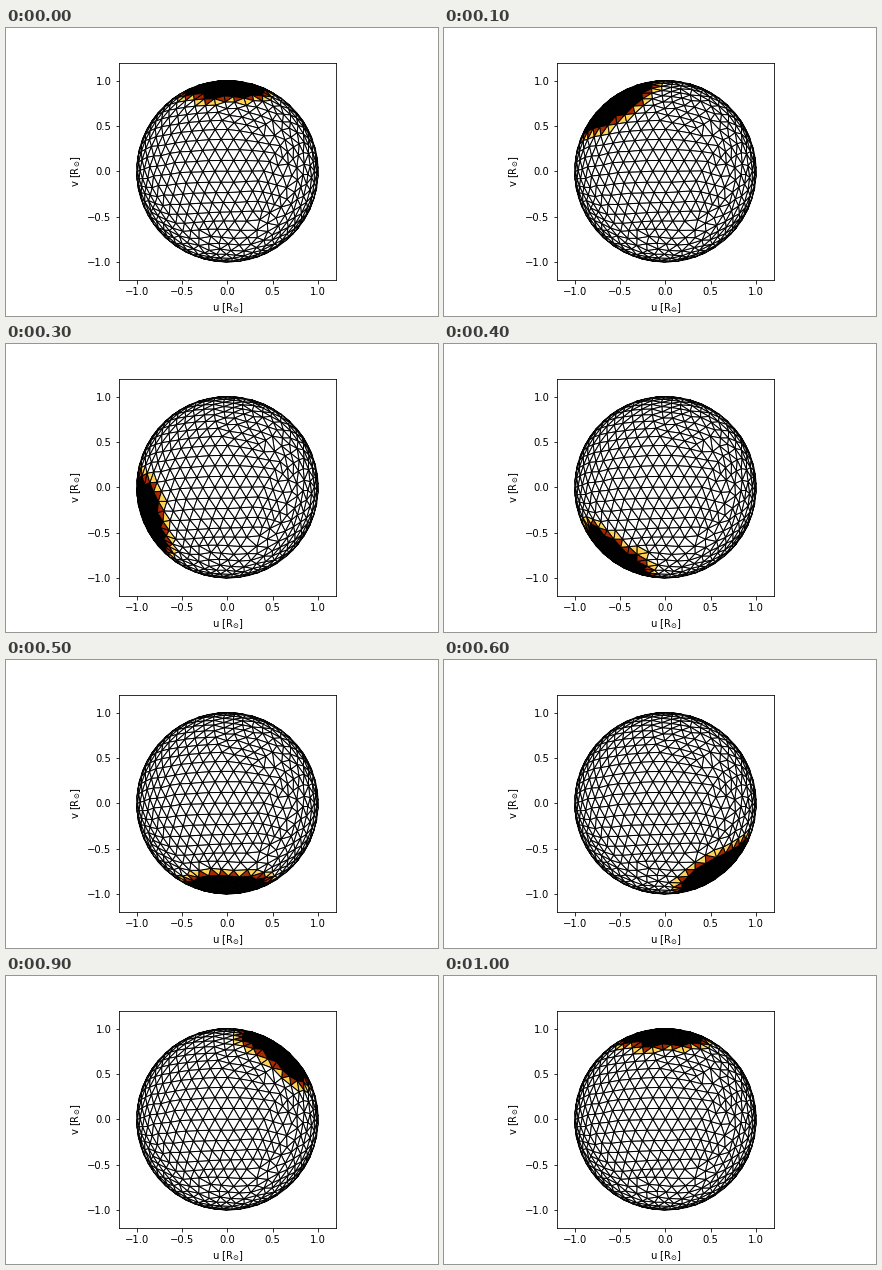
Write a matplotlib script that moves like this. It is 432 by 288 pixels and loops after 1100 ms.

```python
import numpy as np
import matplotlib.pyplot as plt
from matplotlib.animation import FuncAnimation
from matplotlib.collections import PolyCollection

FRAMES, INTERVAL = 11, 100
N_TRIANGLES = 1500
DELTA = np.sqrt(4 / np.sqrt(3) * 4 * np.pi / N_TRIANGLES)
Z_MIN = -0.3  # the far side is never seen
COLAT, RADIUS = np.radians(80), np.radians(30)
MIRROR = np.radians(120)  # axis that sets the winding of the mesh


def unit(v):
    return v / np.linalg.norm(v, axis=-1, keepdims=True)


def dot(a, b):
    return np.sum(a * b, axis=-1)


def turn(n, a, b):
    """Counterclockwise angle from a to b in the plane normal to n."""
    sin = dot(n, np.cross(a, b))
    cos = dot(a, b) - dot(a, n) * dot(b, n)
    return np.arctan2(sin, cos) % (2 * np.pi)


def fan(p, a, angles):
    """Points on the sphere one step from p, at angles from direction a."""
    e1 = unit(a - dot(a, p) * p)
    e2 = np.cross(p, e1)
    return [unit(p + DELTA * (np.cos(t) * e1 + np.sin(t) * e2)) for t in angles]


def front_angles(pos):
    return turn(pos, np.roll(pos, 1, axis=0) - pos, np.roll(pos, -1, axis=0) - pos)


def find_split(pos, omega, start, count):
    """Pair of front members that come too close across the open side."""
    n = len(pos)
    for i in range(start, start + count):
        step = pos - pos[i]
        gap = np.abs(np.arange(n) - i)
        near = np.linalg.norm(step, axis=1) < DELTA
        near &= np.minimum(gap, n - gap) > 2
        for j in np.flatnonzero(near):
            if turn(pos[i], pos[i - 1] - pos[i], step[j]) < omega[i]:
                return min(i, j), max(i, j)
    return None


def march():
    """Marching triangulation of the unit sphere, started at the pole."""
    pole = np.array([0.0, 0.0, 1.0])
    pts = [pole] + fan(pole, np.array([-1.0, 0.0, 0.0]), np.arange(6) * np.pi / 3)
    tris = [(0, k + 1, (k + 1) % 6 + 1) for k in range(6)]
    stack = [list(range(1, 7))]
    while stack and len(tris) < 2 * N_TRIANGLES:
        front = stack[-1]
        if len(front) < 4:
            tris.append(tuple(front[::-1]))
            stack.pop()
            continue
        pos = np.array([pts[k] for k in front])
        omega = np.where(pos[:, 2] > Z_MIN, np.round(front_angles(pos), 9), np.inf)
        i = int(np.argmin(omega))
        w = omega[i]
        if np.isinf(w):
            stack.pop()
            continue

        p, last, nxt = front[i], front[i - 1], front[(i + 1) % len(front)]
        a, b = pts[last] - pts[p], pts[nxt] - pts[p]
        nt = int(3 * w / np.pi) + 1
        if nt > 1 and w / nt < 0.8:
            nt -= 1
        elif nt == 1 and w > 0.8 and np.linalg.norm(a - b) > 1.25 * DELTA:
            nt = 2
        shortest = min(np.linalg.norm(a), np.linalg.norm(b))
        if len(front) == 4 or (w < 3 and shortest <= 0.5 * DELTA):
            nt = 1

        new = list(range(len(pts), len(pts) + nt - 1))
        pts += fan(pts[p], a, np.arange(1, nt) * w / nt)
        ring = [last] + new + [nxt]
        tris += [(p, q, r) for q, r in zip(ring, ring[1:])]
        front[i:i + 1] = new

        if new and len(front) > 5:
            pos = np.array([pts[k] for k in front])
            pair = find_split(pos, front_angles(pos), i, len(new))
            if pair:
                lo, hi = pair
                stack[-1] = front[:lo + 1] + front[hi:]
                stack.append(front[lo:hi + 1])
    return np.array(pts), np.array(tris)


def reflect(pts):
    c, s = np.cos(2 * MIRROR), np.sin(2 * MIRROR)
    return pts @ np.array([[c, s, 0], [s, -c, 0], [0, 0, 1]])


def padded(values):
    lo, hi = values.min(), values.max()
    pad = 0.1 * (hi - lo)
    return lo - pad, hi + pad


points, triangles = march()
corners = points[triangles]
normal = np.cross(corners[:, 1] - corners[:, 0], corners[:, 2] - corners[:, 0])
triangles = triangles[normal[:, 2] > 0]
triangles = triangles[np.argsort(points[triangles, 2].mean(axis=1))]
points = reflect(points)
# Lift the vertices so that the flat faces keep the volume of the sphere.
corners = points[triangles] * (1 + DELTA ** 2 / 8)

fig = plt.figure(figsize=(6, 4), dpi=72, facecolor="white")
fig.subplots_adjust(left=0.125, right=0.9, bottom=0.125, top=0.88)
ax = fig.add_subplot(aspect="equal", xlim=padded(corners[..., 0]), ylim=padded(corners[..., 1]))
ticks = np.linspace(-1, 1, 5)
ax.set_xticks(ticks)
ax.set_yticks(ticks)
ax.set_xlabel(r"u [$\mathrm{R_{\odot}}$]")
ax.set_ylabel(r"v [$\mathrm{R_{\odot}}$]")
mesh = PolyCollection(corners[..., :2], edgecolors="black", linewidths=1)
ax.add_collection(mesh, autolim=False)
cmap = plt.get_cmap("afmhot")


def update(k):
    lon = np.pi / 2 + 2 * np.pi * k / (FRAMES - 1)
    axis = np.array([np.sin(COLAT) * np.cos(lon), np.sin(COLAT) * np.sin(lon), np.cos(COLAT)])
    heat = np.where(points @ axis > np.cos(RADIUS), 0.0, 1.0)
    mesh.set_facecolor(cmap(heat[triangles].mean(axis=1)))
    return (mesh,)


anim = FuncAnimation(fig, update, frames=FRAMES, interval=INTERVAL, repeat=True, repeat_delay=0)
plt.show()
```
